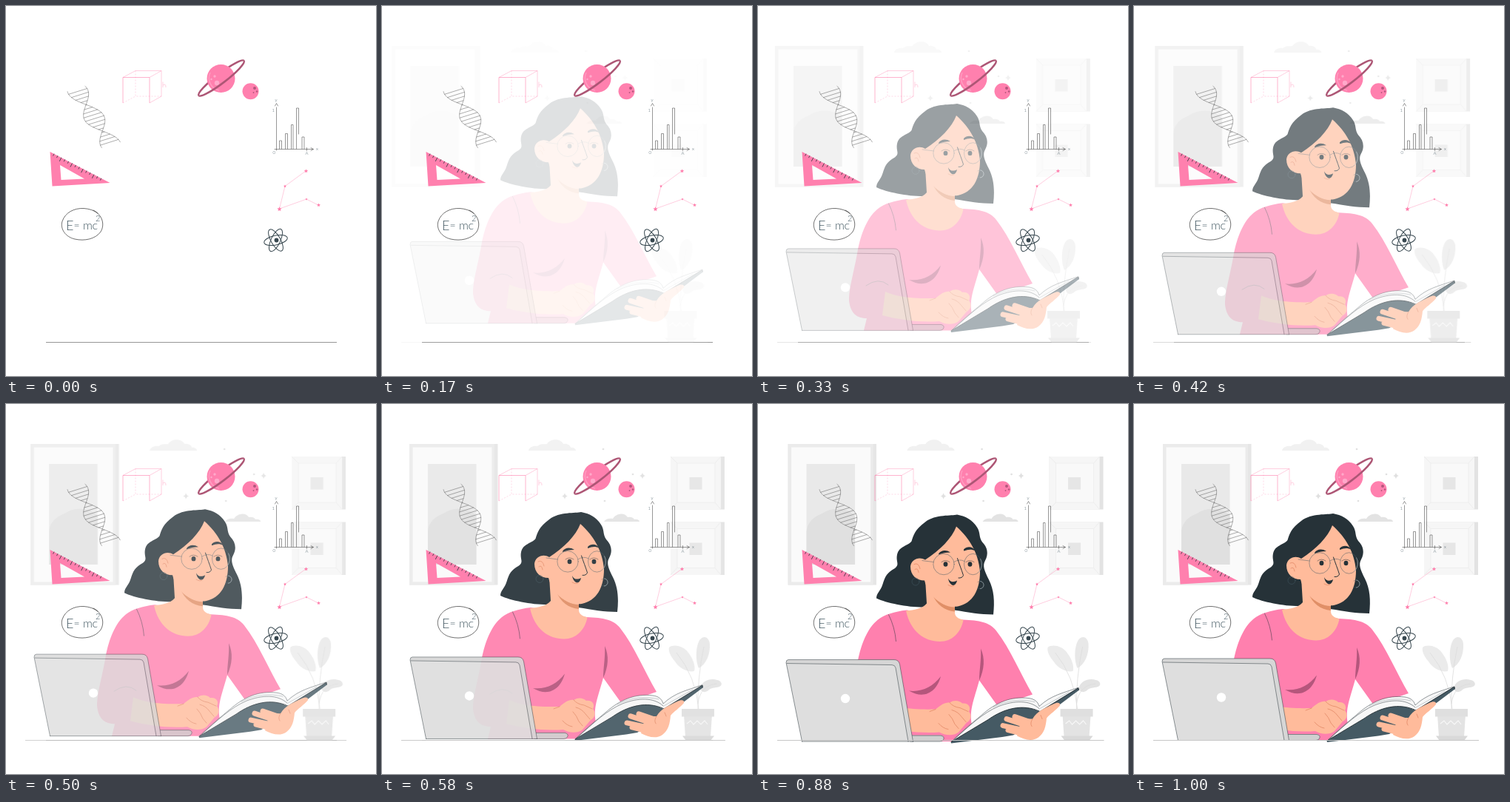
Write an HTML page that moves like this. It is 500 px wide and 500 px high and loops after 1.04 s.

```html
<!DOCTYPE html>
<html lang="en">
<head>
<meta charset="utf-8">
<title>Studying</title>
<style>
  html, body { margin: 0; width: 100%; height: 100%; overflow: hidden; background: #fff; }
  svg { display: block; width: 100vw; height: 100vh; }
  .thin { fill: none; stroke: #263238; stroke-width: .5; stroke-linecap: round; stroke-linejoin: round; }
  .skin { fill: #ffbb9b; }
  .fold { fill: none; stroke: #e28a68; stroke-width: .8; stroke-linecap: round; }
  .fingers { fill: none; stroke: #ffbb9b; stroke-width: 7; stroke-linecap: round; }
  .hair { fill: #263238; }
  .pink { fill: #ff80ae; }
  .rose { fill: none; stroke: #ff80ae; stroke-width: .6; }
  .shade { fill: #b5567c; }
  text { font-family: Lato, Inter, sans-serif; font-weight: 300; fill: #455a64; }
</style>
</head>
<body>
<svg viewBox="0 0 500 500">
  <rect x="54" y="454" width="393" height="1" fill="#969696"/>

  <g id="room">
    <rect x="39" y="54" width="119.500" height="190.500" fill="#e6e6e6"/>
    <rect x="39" y="54" width="115" height="190.500" fill="#ebebeb"/>
    <rect x="43.500" y="58.500" width="107" height="182" fill="#fafafa"/>
    <rect x="64" y="81" width="65.500" height="136" fill="#e9e9e9"/>
    <path d="M64 217V172C65 160 74 152 85 148C98 139 117 139 129.500 151V217Z" fill="#e0e0e0"/>
    <g id="frame">
      <rect x="392" y="71" width="73" height="71.500" fill="#e3e3e3"/>
      <rect x="392" y="71" width="68" height="71.500" fill="#f6f6f6"/>
      <rect x="401" y="80" width="51" height="53" fill="#f9f9f9" stroke="#ebebeb" stroke-width=".7"/>
      <path d="M392 71l9 9M460 71l-8 9M392 142.500l9-9.500M460 142.500l-8-9.500" stroke="#e8e8e8" stroke-width=".7"/>
      <rect x="417.500" y="99" width="17" height="16.500" fill="#e6e6e6"/>
    </g>
    <use href="#frame" y="88.500"/>
    <path d="M200 63C201 58 207 56 212 57C216 53 222 55 225 54C229 47 243 46 247 54C252 53 257 56 257 59C261 58 264 61 264 63Z" fill="#f1f1f1"/>
    <path d="M302 159C304 155 309 154 314 155C317 149 329 145 334 153C339 152 342 154 343 156C347 155 350 157 350 159Z" fill="#e3e3e3"/>
    <g fill="#e0e0e0">
      <path id="spark" d="M249 120Q249.600 123.600 253 124.500Q249.600 125.300 249 129Q248.300 125.300 245 124.500Q248.300 123.600 249 120Z"/>
      <use href="#spark" x="105" y="-27.500"/>
      <circle cx="301" cy="61" r="1.300"/><circle cx="303" cy="131" r="1.300"/><circle cx="341" cy="95" r="1.300"/>
      <path d="M390 329C396 324 410 327 416 336C423 345 426 355 424 361C417 363 404 358 398 348C391 340 389 333 390 329Z" fill="#ebebeb"/>
      <path d="M430 357C425 345 426 326 432 318C437 312 444 315 445 324C446 338 440 352 430 357Z" fill="#e8e8e8"/>
      <path d="M432 384C434 374 446 370 455 373C461 374 463 380 458 382C451 384 447 383 443 387C438 391 433 389 432 384Z" fill="#e3e3e3"/>
      <path d="M400 336Q426 368 430 412M437 328Q428 370 429 412M455 378Q432 380 429 405" fill="none" stroke="#dcdcdc" stroke-width=".8"/>
      <path d="M410 420H448L446 450H412Z" fill="#e3e3e3"/>
      <path d="M414 432l5-4 4 5 5-5 5 5 5-5 4 5" fill="none" stroke="#f7f7f7" stroke-width="1.200"/>
      <rect x="407" y="412" width="44" height="10.500" fill="#dfdfdf"/>
      <path d="M408 448.500H451L446 455H413Z" fill="#d9d9d9"/>
    </g>
  </g>

  <g id="person">
    <path class="hair" d="M269 148C262 150 240 147 226 158C212 168 210 176 207.500 184C202 191 191 190 188 202C186 212 192 215 185 220.500C174 227 172 231 168.500 242C166 251 160 254 160 261C175 268 205 274 229 273L265 277C285 280 300 283 318 283C320 265 319 250 312 236C306 224 303 217 307 210C312 201 310 192 303 185C298 178 301 173 296 165C290 155 280 150 269 148Z"/>
    <path class="pink" d="M201 277C184 279 171 283 162 290C147 302 139 325 135 345C130 375 123 395 123 414C125 432 134 438 147 438L143 454.500H262L289 432C285 412 292 398 299 372L324 407L371 391C355 364 341 329 322 305C313 293 299 291 277 290Z"/>
    <path class="skin" d="M226 235L228 268C222 275 211 277 200 278C206 306 225 319.500 246 319.500C262 319.500 274 308 277.500 290.500C270 288 266 286 266 280V258Z"/>
    <path d="M236 256C245 268 255 273 266 273V279C252 278 241 269 236 256Z" fill="#e08f67"/>
    <path class="skin" d="M268 164C262 180 246 196 226 209C218 204 207 208 206 218C206 230 214 237 225 237C228 249 236 261 247 267C254 271 262 273 270 272C290 268 300 250 300 225C298 200 286 180 268 164Z"/>
    <path class="fold" d="M211 215Q217 212 219 221M212 222Q216 219 217 226"/>
    <g class="thin" style="stroke:#455a64">
      <circle cx="251" cy="215" r="14.200"/><ellipse cx="290.500" cy="215" rx="12" ry="14.200"/>
      <path d="M265 212Q272 207 279 211M237 212L222 210"/>
      <circle cx="213" cy="238.500" r="5"/><path d="M297 239A5 5 0 1 1 297 247"/>
    </g>
    <path d="M300.500 207.500A12 14.200 0 0 1 298 226M300 238A5 5 0 0 1 300 248" fill="none" stroke="#cfd4d6" stroke-width=".5"/>
    <g class="hair">
      <ellipse cx="253.500" cy="215" rx="2.900" ry="3.200"/><ellipse cx="286.500" cy="215" rx="2.900" ry="3.200"/>
      <path d="M244 201C247 196 254 195 260 199C254 199 249 200 244 202ZM278 195C283 190 290 191 294 197C288 194 284 195 278 197Z"/>
      <path d="M257 234C259 239 264 240 269 237C268 242 265 244.500 262 243C259 241 257.500 238 257 234Z"/>
    </g>
    <path d="M248 212Q253 208 259 212M281 212Q286 208 292 212" class="thin"/>
    <path d="M269.500 207C272 215 275 222 277.500 230Q276 234 271 233.500" class="thin" style="stroke-width:1"/>
    <path d="M257 243Q262 246 265 244" class="fold" stroke-width="1.500"/>

    <path class="shade" d="M204 386C221 388 236 381 247 366.500C242 386 226 399 204 386Z"/>
    <path class="shade" d="M301 329C307 342 306 357 299 372C299 358 302 344 301 329Z"/>
    <path class="thin" d="M176.500 283Q185 300 186.500 319M146 394Q163 382 176 393"/>

    <path class="skin" d="M172 402C185 408 205 412 240 411C247 405 253 401 259 402C265 398 272 399 276 403C285 402 288 409 285 414C289 419 288 426 282 429L271 442C263 448 252 446 245 442C220 444 190 440 168 434Z"/>
    <path class="fold" d="M259 402Q264 408 273 409L284 414M262 412Q270 414 275 421L281 428M258 418Q263 423 266 431L271 437M240 411L232 414M244 430Q250 437 257 438"/>

    <path d="M261 455L311 425C332 409 358 403 380 414L433 382L434 385L386 421L345 446L330 448.500L261 457Z" fill="#455a64"/>
    <path d="M261 455C278 439 291 428 302 419C321 402 342 393 366 396C373 397 378 400 380 407C396 392 412 389 432 382L381 414C356 402 331 411 311 425Z" fill="#f7f7f7"/>
    <g class="thin">
      <path d="M261 455C278 439 291 428 302 419C321 402 342 393 366 396C373 397 378 400 380 407C396 392 412 389 432 382"/>
      <path d="M262 454.500C287 432 304 416 325 407C346 399 367 398 380 410"/>
      <path d="M318 408C337 398 357 397 374 401M381 410L420 388" stroke="#8f999e"/>
      <path d="M261 455L311 425C332 410 358 403 381 414L433 382V385" style="stroke-width:1"/>
    </g>
    <path class="fingers" d="M376 431L347 421M372 436L336 424M368 441L331 433M366 446L338 439"/>
    <path class="skin" d="M356 424L371 424C377 413 389 409 399 404C405 401 409 402 408 406C402 413 395 417 390 423C389 434 387 443 379 449C371 455 359 452 350 447Z"/>
    <path class="fold" d="M371 424Q367 430 370 434M382 419L384 424"/>
  </g>

  <g id="laptop">
    <path d="M204 446H247Q252 447 251 451Q250 454.500 246 454.500H205Z" fill="#d0d0d0"/>
    <path class="thin" d="M206 446.500H247Q252 447.500 251 451Q250 454.500 246 454.500H206"/>
    <path d="M41 344H184Q190 344 191.500 350L209.500 454.500H59.500L38 348Q38 344 41 344Z" fill="#d6d6d6"/>
    <path d="M39 349L181 351Q185 351 186 355L203 454.500H59.500Z" fill="#dedede"/>
    <path class="thin" d="M59.500 454.500L38 348Q38 344 41 344H184Q190 344 191.500 350L209.500 454.500M39 349L181 351Q185 351 186 355L203 454.500M59.500 454.500H209.500"/>
    <circle cx="118" cy="396.500" r="6.200" fill="#fff"/>
  </g>

  <rect id="floor" x="26" y="454" height="1" fill="#c6c6c6"/>

  <path id="dna" class="thin" style="stroke:#5a5a5a"/>

  <g class="rose">
    <path d="M158 131V96.500H194V131"/>
    <path d="M158 96.500L175 87.500H210V122L194 131M194 96.500L210 87.500" opacity=".65"/>
    <path d="M175 87.500V122H210M158 131L175 122" stroke-dasharray="2 2" opacity=".5"/>
    <path d="M212 102.500V110M212 107Q216 104 216 110" opacity=".6"/>
  </g>

  <g fill="none" stroke="#ad5675" stroke-width="2.600">
    <path d="M252.500 97.500A38.500 6.500 0 0 1 329.500 97.500" transform="rotate(-37.500 291 97.500)"/>
    <circle class="pink" cx="290.500" cy="98" r="19" stroke="none"/>
    <path d="M276 90A17 17 0 0 0 288 114" stroke="#ff9cc1" stroke-width="1.500"/>
    <g fill="#ffa9ca" stroke="none"><circle cx="285" cy="104" r="3.200"/><circle cx="282" cy="95" r="1.700"/><circle cx="277.500" cy="99" r="1.200"/></g>
    <path d="M252.500 97.500A38.500 6.500 0 0 0 329.500 97.500" transform="rotate(-37.500 291 97.500)"/>
  </g>
  <circle class="pink" cx="330.500" cy="115.300" r="11"/>
  <g class="shade"><circle cx="336" cy="111" r="2"/><circle cx="339" cy="115.500" r="1.200"/><circle cx="334.500" cy="117" r=".9"/></g>

  <g class="thin" style="stroke:#333">
    <path d="M365.500 137V195M363.500 135L365.500 131.500L367.500 135M363 193.500H415M412 191.500L415.500 193.500L412 195.500"/>
    <path d="M369.500 193V182H372.500V193M377.500 193V172.500H380.500V193M385.500 193V160.500H388V193M392.500 193V138H395.500V173M400 193V177H403V193M406.500 191.500V195.500"/>
  </g>
  <g font-size="6">
    <text x="363.500" y="129">y</text><text x="419" y="194.500">x</text><text x="360.500" y="199.500">0</text>
    <text x="404.500" y="200.500">A</text><text x="359.500" y="143">1</text>
  </g>

  <path class="pink" fill-rule="evenodd" d="M59.500 197L140.500 239L62.500 243.500ZM73 215L74.500 235L106 233.500Z"/>
  <path id="ticks" class="thin" style="stroke-width:.8"/>

  <path class="thin" style="stroke:#333;stroke-width:.7" d="M118 276C130 282 134 295 128 305C121 315 106 318 93 315C80 312 73 301 76 291C80 279 92 273 105 273.500C112 274 119 276 124 280"/>
  <g font-size="18">
    <text x="81" y="302.500">E</text><text x="91.500" y="301" font-size="14">=</text>
    <text x="104" y="301.500" font-size="16">m</text><text x="116.500" y="301.500" font-size="16">c</text><text x="121" y="291" font-size="11">2</text>
  </g>

  <path class="rose" d="M405 223L377 243.500L369.500 274L406 261L422 269" style="stroke-width:.4"/>
  <g id="stars" class="pink"></g>

  <g fill="none" stroke="#37474f">
    <ellipse cx="364.500" cy="316.500" rx="16" ry="6.300" transform="rotate(-12 364.500 316.500)"/>
    <ellipse cx="364.500" cy="316.500" rx="16.500" ry="6.300" transform="rotate(60 364.500 316.500)"/>
    <ellipse cx="364.500" cy="316.500" rx="16.500" ry="6.300" transform="rotate(115 364.500 316.500)"/>
    <circle cx="365.500" cy="316.500" r="2.900" fill="#37474f" stroke="none"/>
  </g>
</svg>
<script>
const $ = id => document.getElementById(id);

// Double helix: two mirrored sine strands with rungs, along a slanted axis
const helix = (s, side) => {
  const w = side * 13 * Math.sin(Math.PI * (s - 25) / 42);
  return `${(95 + .526 * s - .96 * w).toFixed(1)} ${(112 + .85 * s + .3 * w).toFixed(1)}`;
};
let strands = '';
for (const side of [-1, 1])
  for (let s = 0; s <= 89; s++) strands += (s ? 'L' : 'M') + helix(s, side);
for (let s = 4; s < 89; s += 5.4)
  strands += `M${helix(s, -1)}L${helix(s, 1)}`;
$('dna').setAttribute('d', strands);

// Ruler marks along the long side
let marks = '';
for (let i = 1; i < 15; i++) {
  const x = 60 + i * 4.9, y = 197.5 + i * 2.54, len = i % 3 ? 2.5 : 5;
  marks += `M${x} ${y}l${-len * .46} ${len * .89}`;
}
$('ticks').setAttribute('d', marks);

const star = (x, y, r) => {
  const pts = Array.from({ length: 10 }, (_, i) => {
    const a = Math.PI * (i / 5 - .5), d = i % 2 ? r * .45 : r;
    return `${x + d * Math.cos(a)},${y + d * Math.sin(a)}`;
  });
  return `<polygon points="${pts.join(' ')}"/>`;
};
$('stars').innerHTML = [[405.5, 223, 2.8], [377, 243.5, 2.2], [369.5, 274.5, 3.3], [406, 261, 1.7], [422.5, 269, 2.6]]
  .map(s => star(...s)).join('');

// cubic-bezier(.36, -.01, .5, 1.38)
const curve = (s, a, b) => 3 * (1 - s) ** 2 * s * a + 3 * (1 - s) * s * s * b + s ** 3;
const ease = x => {
  let lo = 0, hi = 1;
  for (let i = 0; i < 24; i++) {
    const mid = (lo + hi) / 2;
    if (curve(mid, .36, .5) < x) lo = mid; else hi = mid;
  }
  return curve(hi, -.01, 1.38);
};

const LOOP = 1040, FPS = 24, LEAD = .033, SHIFT = 30;
const start = performance.now();

function draw(now) {
  const t = Math.max(0, now - start) % LOOP;
  const step = Math.floor((Math.floor(t / 10) + .49) * FPS / 100);
  const p = ease(Math.min(1, step / FPS + LEAD));
  const off = SHIFT * (p - 1);
  const alpha = step ? Math.min(1, p) : 0;
  const place = (id, x, y) => {
    $(id).setAttribute('transform', `translate(${x} ${y})`);
    $(id).setAttribute('opacity', alpha);
  };
  place('room', off, 0);
  place('person', 0, off);
  place('laptop', 0, off);
  $('floor').setAttribute('width', 440 + off);
  $('floor').setAttribute('opacity', alpha);
  requestAnimationFrame(draw);
}
draw(start);
</script>
</body>
</html>
```
